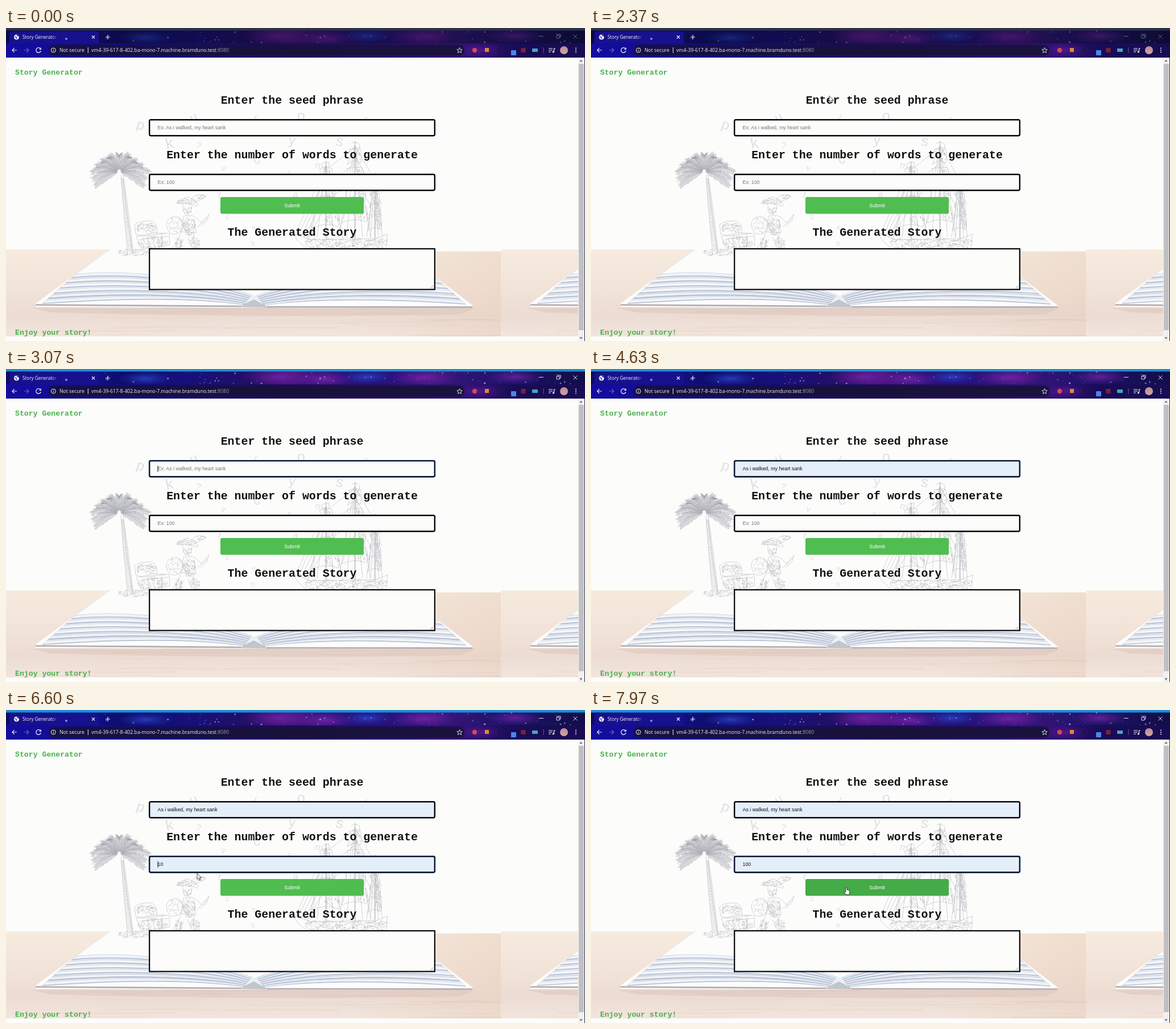
Animation, 1018 px wide and 550 px high, one loop 8 s. Source, as an HTML page:

```html
<!DOCTYPE html>
<html lang="en">
<head>
<meta charset="utf-8">
<title>Story Generator</title>
<style>
  html, body { margin: 0; width: 100%; height: 100%; overflow: hidden; background: #fcfdfb; }
  svg { display: block; width: 100vw; height: 100vh; }
  text { white-space: pre; }
  .ui { font-family: "Open Sans", "Noto Sans", sans-serif; font-size: 8.7px; fill: #eeeef6; }
  .form { font-family: "Liberation Sans", Arial, sans-serif; font-size: 8.85px; }
  .head { font: bold 19.9px "Liberation Mono", monospace; text-anchor: middle; fill: #101010; }
  .brand { font: bold 13.2px "Liberation Mono", monospace; fill: #4caf50; }
  .letters { font-family: "Liberation Sans", Arial, sans-serif; fill: #dfdfe5; text-anchor: middle; }
  .ink { fill: none; stroke: #8f8f9c; stroke-width: .65; opacity: .6; }
  .icon { fill: none; stroke: #f0f0f8; stroke-width: 1.2; }
  .box { fill: #fcfdfb; stroke: #060608; stroke-width: 2.4; }
  .ring { fill: none; stroke: #27477f; stroke-width: .7; }
</style>
</head>
<body>
<svg viewBox="0 0 1018 550" preserveAspectRatio="none">
  <defs>
    <linearGradient id="wood" x2="0" y2="1">
      <stop offset="0" stop-color="#f6ebde"/><stop offset=".45" stop-color="#f2e3d8"/>
      <stop offset=".75" stop-color="#ecdcd3"/><stop offset="1" stop-color="#f2e5dd"/>
    </linearGradient>
    <linearGradient id="woodSide"><stop offset=".7" stop-color="#e6ccb8" stop-opacity="0"/><stop offset="1" stop-color="#e6ccb8" stop-opacity=".4"/></linearGradient>
    <linearGradient id="sky">
      <stop offset="0" stop-color="#0d0c62"/><stop offset=".1" stop-color="#1511a4"/>
      <stop offset=".2" stop-color="#0e0d6c"/><stop offset=".32" stop-color="#17107a"/>
      <stop offset=".42" stop-color="#220f66"/><stop offset=".5" stop-color="#42157c"/>
      <stop offset=".63" stop-color="#20127c"/><stop offset=".74" stop-color="#3b157c"/>
      <stop offset=".87" stop-color="#1c1268"/><stop offset="1" stop-color="#110e48"/>
    </linearGradient>
    <linearGradient id="bar">
      <stop offset="0" stop-color="#130da0"/><stop offset=".25" stop-color="#110b80"/>
      <stop offset=".5" stop-color="#1d0c58"/><stop offset=".8" stop-color="#2f1072"/>
      <stop offset=".88" stop-color="#180c56"/><stop offset="1" stop-color="#180d52"/>
    </linearGradient>
    <radialGradient id="glow"><stop stop-color="#9a2cc0" stop-opacity=".55"/><stop offset="1" stop-color="#8020b0" stop-opacity="0"/></radialGradient>
    <radialGradient id="blue"><stop stop-color="#3558e8" stop-opacity=".6"/><stop offset="1" stop-color="#2038c0" stop-opacity="0"/></radialGradient>
    <linearGradient id="fade" gradientUnits="userSpaceOnUse" x1="81" x2="90"><stop stop-color="#f4f4fa"/><stop offset="1" stop-color="#f4f4fa" stop-opacity=".1"/></linearGradient>
    <linearGradient id="photo" x2="0" y2="1"><stop stop-color="#b98c94"/><stop offset="1" stop-color="#d3a5a6"/></linearGradient>
    <clipPath id="page"><rect y="52" width="1006" height="490"/></clipPath>
  </defs>

  <rect width="1018" height="550" fill="#fcfdfb"/>
  <g clip-path="url(#page)">
    <g id="scene">
      <rect y="389" width="870" height="153" fill="url(#wood)"/>
      <rect y="389" width="870" height="153" fill="url(#woodSide)"/>
      <g id="grain" fill="none" stroke="#d9bfb0"></g>
      <rect x="691" y="388" width="179" height="4.5" fill="#fcfdfb"/>
      <path d="M45 492H825L800 503Q436 510 80 500Z" fill="#d5bcb2" opacity=".4"/>
      <path d="M183 388L52 484V490L414 491 420 488H452L458 491 820 492V487L691 388Z" fill="#fcfcfb"/>
      <g id="leaves"></g>
      <use href="#leaves" transform="translate(872 1) scale(-1 1)"/>
      <path d="M52 486.500L414 489M458 490L820 490.500" stroke="#b0abb2" stroke-width="2.600"/>
      <path d="M413 490L431 471H441L459 491Z" fill="#c0c6cc"/>
      <path d="M419 485L432 470H440L453 486 436 477Z" fill="#edf0f3"/>
      <g id="drawing" class="ink"></g>
      <g id="letters" class="letters"></g>
    </g>
    <use href="#scene" x="870"/>
  </g>

  <g id="browser">
    <rect width="1018" height="52" fill="url(#sky)"/>
    <ellipse cx="480" cy="14" rx="65" ry="18" fill="url(#glow)"/>
    <ellipse cx="560" cy="18" rx="50" ry="14" fill="url(#glow)"/>
    <ellipse cx="735" cy="15" rx="60" ry="15" fill="url(#glow)"/>
    <ellipse cx="895" cy="14" rx="50" ry="13" fill="url(#glow)"/>
    <ellipse cx="245" cy="17" rx="50" ry="13" fill="url(#blue)"/>
    <ellipse cx="635" cy="14" rx="45" ry="13" fill="url(#blue)"/>
    <g id="stars" fill="#b9c0ff"></g>
    <rect id="shade" y="4" width="1018" height="23" fill="#08081c" opacity=".42"/>
    <rect y="27" width="1018" height="25" fill="url(#bar)"/>
    <ellipse cx="835" cy="39" rx="45" ry="13" fill="url(#glow)" opacity=".6"/>
    <rect id="edge" width="1018" height="4.500"/>
    <path d="M2 27Q6 27 6 22V10Q6 6 10 6H159Q163 6 163 10V22Q163 27 167 27Z" fill="#17118e"/>
    <circle cx="106" cy="19" r="2" fill="#a9a5ff" opacity=".8"/>
    <circle cx="18.500" cy="16" r="4.600" fill="#f2f2f8"/>
    <path d="M15 15l3 1 1 3M19 12l2 2 2 0" stroke="#25208a" stroke-width="1.300" fill="none"/>
    <text class="ui" x="29" y="19" style="font-size:8.1px;fill:url(#fade)">Story Generator</text>
    <path class="icon" d="M151 13.500l5 5m0-5l-5 5M175 16h8m-4-4v8"/>
    <path id="controls" class="icon" d="M937 14.500h8M968 13h5v5h-5zM970 13v-2h5v5h-2M997.500 11.500l7 7m0-7l-7 7" style="stroke-width:.9"/>
    <rect x="75" y="29.500" width="731" height="19" rx="9.500" fill="#171337" opacity=".88"/>
    <path class="icon" d="M19 39h-8m3.700-3.800L11 39l3.700 3.800M60.600 36.500A4.300 4.300 0 1 0 61.300 40M61.400 34.500v3h-3"/>
    <path class="icon" d="M32 39h8m-3.700-3.800L40 39l-3.700 3.800" opacity=".4"/>
    <circle class="icon" cx="83.300" cy="39" r="4" style="stroke-width:1"/>
    <path class="icon" d="M83.300 38.300v3M83.300 36.400v1M144.300 34v10" style="stroke-width:1"/>
    <text class="ui" x="94" y="42.400">Not secure</text>
    <text class="ui" x="150" y="42.400">vm4-39-617-8-402.ba-mono-7.machine.bramduno.test<tspan fill="#9a98ad">:8080</tspan></text>
    <path class="icon" d="M797.500 34.500l1.300 3.200 3.400.2-2.600 2.200.9 3.400-3-1.900-3 1.900.9-3.400-2.600-2.200 3.400-.2z" style="stroke-width:.9"/>
    <circle cx="824" cy="39" r="4.200" fill="#d64a52"/>
    <rect x="842" y="35" width="7" height="7" fill="#d98b35"/>
    <circle cx="867" cy="39" r="4" fill="#21124c"/>
    <rect x="888" y="39" width="9" height="9" rx="1" fill="#4a86ee"/>
    <rect x="905.500" y="35" width="8" height="8" fill="#7c1f3d"/>
    <rect x="925" y="36" width="10" height="6" rx="1" fill="#4aa3c4"/>
    <path d="M945 34v10" stroke="#66589a"/>
    <path class="icon" d="M954 36h7M954 39h7M954 42h4M963.500 42v-6h2.500"/>
    <circle cx="962.300" cy="42" r="1.500" fill="#f0f0f8"/>
    <circle cx="981" cy="39" r="7" fill="url(#photo)"/>
    <g fill="#f0f0f8"><circle cx="1002" cy="35.500" r="1"/><circle cx="1002" cy="39" r="1"/><circle cx="1002" cy="42.500" r="1"/></g>
  </g>

  <rect x="1006" y="52" width="12" height="498" fill="#f0f0f1"/>
  <rect x="1007" y="63" width="9" height="468" fill="#c0c0c4"/>
  <path d="M1008.500 59l2.500-3 2.500 3zM1008.500 543.500l2.500 3 2.500-3z" fill="#5b5b60"/>
  <path d="M1017.500 52V550" stroke="#2a2950"/>

  <text class="brand" x="16" y="81.500">Story Generator</text>
  <text class="brand" x="16" y="539">Enjoy your story!</text>
  <text class="head" x="503" y="132.500">Enter the seed phrase</text>
  <text class="head" x="503" y="229">Enter the number of words to generate</text>
  <text class="head" x="503" y="365">The Generated Story</text>

  <g id="fields" class="form"></g>
  <rect id="button" x="377" y="297" width="252" height="29.500" rx="3"/>
  <text class="form" x="503" y="314.500" fill="#fff" text-anchor="middle">Submit</text>
  <rect class="box" x="252.200" y="388" width="501.600" height="71.500" style="stroke-width:2.200"/>
  <path d="M746 457.500l5-5M749 457.500l2-2" stroke="#85858a" stroke-width=".8"/>
  <path id="caret" stroke="#111" stroke-width="1"/>

  <g id="cursor">
    <path id="arrow" d="M0 0V10.500L2.500 8.300 4.200 12 6 11.200 4.400 7.700H7.600Z" fill="#fff" stroke="#22222a" stroke-width=".8"/>
    <path id="beam" d="M-2 -6H2M0 -6V6M-2 6H2" fill="none" stroke="#444" stroke-width=".9"/>
    <path id="hand" d="M-1.200 1Q0 -.600 1 1V5.200Q2 4.400 2.800 5.500 4 5 4.400 6.100 5.600 5.700 5.800 7V10L4.600 13.500H-.800L-3.600 9.200Q-4 7.400-2.400 8L-1.200 9Z" fill="#fff" stroke="#15151a" stroke-width=".8"/>
  </g>
</svg>

<script>
const $ = id => document.getElementById(id);
const add = (parent, tag, attrs, text) => {
  const node = document.createElementNS('http://www.w3.org/2000/svg', tag);
  for (const key in attrs) node.setAttribute(key, attrs[key]);
  if (text) node.textContent = text;
  return parent.appendChild(node);
};
let seed = 41;
const random = () => (seed = seed * 16807 % 2147483647) / 2147483647;
const between = (a, b) => a + (b - a) * random();
const mix = (a, b, k) => a + (b - a) * k;
const line = (...p) => 'M' + p.map(v => v.toFixed(1)).join(' ');
const ink = (d, attrs) => add($('drawing'), 'path', { d, ...attrs });

// Short parallel strokes scattered over an ellipse
function hatch(cx, cy, rx, ry, count, slope) {
  let d = '';
  for (let i = 0; i < count; i++) {
    const r = Math.sqrt(random()), a = between(0, 2 * Math.PI), len = between(1.5, 4);
    const x = cx + rx * r * Math.cos(a), y = cy + ry * r * Math.sin(a);
    d += line(x, y, x + len * Math.cos(slope), y + len * Math.sin(slope));
  }
  ink(d);
}

function drawPalm() {
  let d = '';
  for (let i = 0; i <= 12; i++) {
    const a = Math.PI * (.84 + i / 12 * 1.32), c = Math.cos(a), s = Math.sin(a);
    const reach = between(.88, 1.04);
    const at = k => [
      199 + reach * (2 * k * (1 - k) * 28 * c + k * k * 52 * c),
      252 + reach * (2 * k * (1 - k) * (25 * s - 6) + k * k * (38 * s + 8))];
    for (let k = .06; k < 1; k += .035) {
      const [x, y] = at(k), [u, v] = at(k + .035), dir = Math.atan2(v - y, u - x);
      d += line(x, y, u, v);
      for (const side of [-.6, .6]) {
        const len = between(8, 13) * (.45 + 2.2 * k * (1 - k));
        d += line(x, y, x + len * Math.cos(dir + side), y + len * Math.sin(dir + side) + 1);
      }
    }
  }
  for (let k = 0; k < 1; k += .02) {
    const x = mix(204, 219, k) - 3 * k * (1 - k), y = mix(264, 394, k), w = mix(2.2, 4.2, k);
    d += `M${x - w} ${y}q${w} ${between(1, 3)} ${2 * w} 0v2.600h${-between(1, 3)}`;
  }
  ink(d + 'M202 258Q207 330 214 397M206 258Q216 325 224 396');
  hatch(224, 395, 32, 6, 100, -.5);
}

function drawChest() {
  ink('M228 362L226 346Q233 338 256 339 268 345 265 362M232 359L231 347Q240 342 260 348M229 366L264 360 287 361 288 381 238 389ZM237 371L286 366M251 364V388M274 362V385M228 362L240 366 281 361');
  hatch(247, 351, 18, 10, 75, .2);
  hatch(258, 376, 27, 11, 150, 1.3);
}

function drawPirate() {
  ink('M299 308Q307 300 310 302 318 293 328 301 342 311 336 313 317 306 299 308ZM326 301Q335 288 352 296 342 302 333 306M311 311Q310 326 318 327 327 324 327 312M313 318h3M320 318h3M316 323h6M311 331Q325 326 334 333L345 343 354 333M337 350L357 327 353 339 342 349M282 348Q281 331 300 331 312 336 312 349 306 364 292 362 284 358 282 348ZM312 332L308 358 334 360 331 336M308 358L302 374 292 387 304 387 313 371M331 360L329 374 342 387 327 386 319 368');
  hatch(298, 347, 15, 14, 70, -.8);
  hatch(321, 347, 11, 17, 150, .9);
  hatch(317, 305, 17, 6, 60, .1);
  hatch(319, 319, 8, 7, 25, 1.2);
  hatch(340, 297, 9, 4, 20, -.4);
  hatch(304, 377, 7, 10, 50, 1.9);
  hatch(331, 376, 9, 10, 60, .9);
}

function drawShip() {
  let d = '';
  // x, top, half width at the deck
  const masts = [[562, 234, 30], [613, 199, 28], [648, 254, 14]];
  for (const [x, top, half] of masts) {
    d += line(x, top, x, 374) + line(x + 1.5, top, x + 1.5, 374);
    for (let i = -1; i <= 1; i += .5) d += line(x, top + 8, x + i * half, 368);
    for (let k = 0; k < .95; k += .25) {
      const y = mix(top + 14, 350, k), w = half * mix(.35, .85, k);
      d += `M${x - w} ${y}Q${x} ${y - 4} ${x + w} ${y - 2}Q${x + w + 5} ${y + 14} ${x + w} ${y + 25}Q${x} ${y + 16} ${x - w - 3} ${y + 27}Q${x - w + 5} ${y + 12} ${x - w} ${y}`;
      hatch(x + w / 2, y + 11, w * .6, 11, 34, 1.4);
    }
  }
  for (let i = 0; i < 5; i++) d += line(562, 242 + i * 18, 509 + i * 5, 362 + i * 2);
  for (let i = 0; i < 4; i++) d += line(613, 210 + i * 28, 562, 250 + i * 28) + line(613, 206 + i * 18, 661, 290 + i * 20);
  ink(d + 'M607 203Q615 197 622 205L621 214 608 211M556 238l12-3v8l-12 2M505 360L535 372 650 370 671 362 668 387H528L512 373Z');
  for (let i = 0; i < 5; i++) hatch(540 + i * 28, 378, 19, 9, 70, .05);
}

function drawBook() {
  const low = [64, 484, 180, 476, 320, 472, 420, 486], high = [122, 433, 200, 424, 340, 436, 433, 470];
  const curve = k => {
    const p = low.map((v, i) => mix(v, high[i], k));
    return `M${p[0]} ${p[1]}C${p.slice(2)}`;
  };
  for (let i = 0; i < 18; i++) {
    add($('leaves'), 'path', {
      d: curve(i / 17), fill: 'none', 'stroke-width': between(1.2, 2.4),
      stroke: ['#b4bfd5', '#eef1f5', '#d3d9e6'][i % 3]
    });
  }
  add($('leaves'), 'path', { d: 'M64 484L122 433 183 389', fill: 'none', stroke: '#d8d5d8', 'stroke-width': .8 });
}

function drawGrain() {
  for (let i = 0; i < 26; i++) {
    const y = between(492, 541), x = between(-60, 800);
    add($('grain'), 'path', {
      d: `M${Math.max(0, x)} ${y}Q${x + 90} ${y + between(-5, 5)} ${Math.min(870, x + 200)} ${y}`,
      'stroke-width': between(1, 4), opacity: between(.08, .22)
    });
  }
}

function drawLetters() {
  const glyphs = [
    ['p', 234, 178, 25, 20], ['k', 289, 211, 27, -12], ['u', 333, 164, 23, -25], ['?', 337, 212, 16, 15],
    ['/', 435, 166, 19, 15], ['o', 519, 163, 25, 0], ['y', 502, 205, 24, 8], ['s', 585, 207, 26, 12],
    ['m', 549, 247, 17, 15], ['c', 443, 238, 23, -20], ['v', 381, 251, 15, 15], ['a', 508, 297, 16, 12],
    ['t', 374, 298, 17, 15], ['c', 390, 336, 13, -15], ['e', 435, 354, 12, 5], ['b', 435, 382, 12, -10],
    ['/', 626, 165, 17, 40], ['x', 497, 258, 14, 10]];
  for (const [char, x, y, size, turn] of glyphs)
    add($('letters'), 'text', { x, y, 'font-size': size, transform: `rotate(${turn} ${x} ${y})` }, char);
}

function drawStars() {
  for (let i = 0; i < 150; i++)
    add($('stars'), 'circle', { cx: between(170, 1010), cy: between(5, 27), r: .3 + random() ** 3 * 1.2, opacity: between(.25, .9) });
}

drawGrain(); drawBook(); drawPalm(); drawChest(); drawPirate(); drawShip(); drawLetters(); drawStars();

const makeField = (y, placeholder) => {
  const shape = { x: 252.2, y, width: 501.6, height: 28, rx: 2.5 };
  return {
    placeholder, y,
    box: add($('fields'), 'rect', { class: 'box', ...shape }),
    ring: add($('fields'), 'rect', { class: 'ring', ...shape, x: 251.3, y: y - .9, width: 503.4, height: 29.8 }),
    label: add($('fields'), 'text', { x: 266.5, y: y + 16.5 })
  };
};
const phrase = makeField(161.3, 'Ex: As i walked, my heart sank');
const count = makeField(257.3, 'Ex: 100');

const LOOP = 8000, FOCUS = 2970, SWITCH = 5530;
const phraseSteps = [[3570, 'As i walked, my heart sank']];
const countSteps = [[6500, '10'], [7100, '100']];
// from, to, x, field
const carets = [
  [FOCUS, 3500, 267, phrase], [4130, 4630, 372, phrase], [5130, SWITCH, 372, phrase],
  [SWITCH, 6100, 267, count], [6500, 7100, 267, count], [7100, 7600, 282, count]];
// Each run: time, x, y
const paths = [
  [[2170, 430, 26], [2370, 419, 119], [2530, 404, 160], [2730, 394, 175], [FOCUS, 394, 175]],
  [[4665, 373, 196], [4770, 370, 241], [5100, 370, 241], [5330, 339, 256], [5530, 338, 270],
    [6480, 338, 270], [6590, 336, 287], [7080, 336, 287], [7300, 346, 308], [7500, 376, 321],
    [7870, 440, 310], [7930, 440, 310], [7970, 449, 311], [LOOP, 449, 311]]];

function pointer(t) {
  const path = paths.find(p => t >= p[0][0] && t < p[p.length - 1][0]);
  if (!path) return null;
  const i = path.findIndex(p => p[0] > t), a = path[i - 1], b = path[i];
  const k = (t - a[0]) / (b[0] - a[0]);
  return [mix(a[1], b[1], k), mix(a[2], b[2], k)];
}

const show = (node, on) => node.setAttribute('visibility', on ? 'visible' : 'hidden');
const paintField = (field, value, focused) => {
  field.label.textContent = value || field.placeholder;
  field.label.setAttribute('fill', value ? '#111' : '#757575');
  field.box.style.fill = value ? '#e5effa' : '#fcfdfb';
  field.box.style.stroke = focused ? '#070d20' : '#060608';
  show(field.ring, focused);
};
const valueAt = (steps, t) => steps.reduce((value, [time, next]) => t >= time ? next : value, '');

function render(t) {
  const active = t >= FOCUS;
  $('edge').setAttribute('fill', active ? '#218bd5' : '#2c3149');
  show($('shade'), !active);
  $('controls').setAttribute('opacity', active ? 1 : .4);
  paintField(phrase, valueAt(phraseSteps, t), active && t < SWITCH);
  paintField(count, valueAt(countSteps, t), t >= SWITCH);

  const caret = carets.find(c => t >= c[0] && t < c[1]);
  show($('caret'), caret);
  if (caret) $('caret').setAttribute('d', `M${caret[2]} ${caret[3].y + 8.5}v11`);

  const p = pointer(t);
  const [x, y] = p || [0, 0];
  const hover = x > 377 && x < 629 && y > 297 && y < 327;
  const inField = x > 252 && x < 754 && [phrase, count].some(f => y > f.y && y < f.y + 28);
  $('cursor').setAttribute('transform', `translate(${x} ${y})`);
  show($('arrow'), p && !hover && !inField);
  show($('beam'), p && inField);
  show($('hand'), p && hover);
  $('button').setAttribute('fill', hover ? '#45aa48' : '#50bd50');
}

const start = performance.now();
const FRAME = 100 / 3;
function tick() {
  const t = (performance.now() - start) % LOOP;
  render(Math.min(LOOP - 1, Math.floor((t + 5) / FRAME) * FRAME + 4));
  requestAnimationFrame(tick);
}
tick();
</script>
</body>
</html>
```
